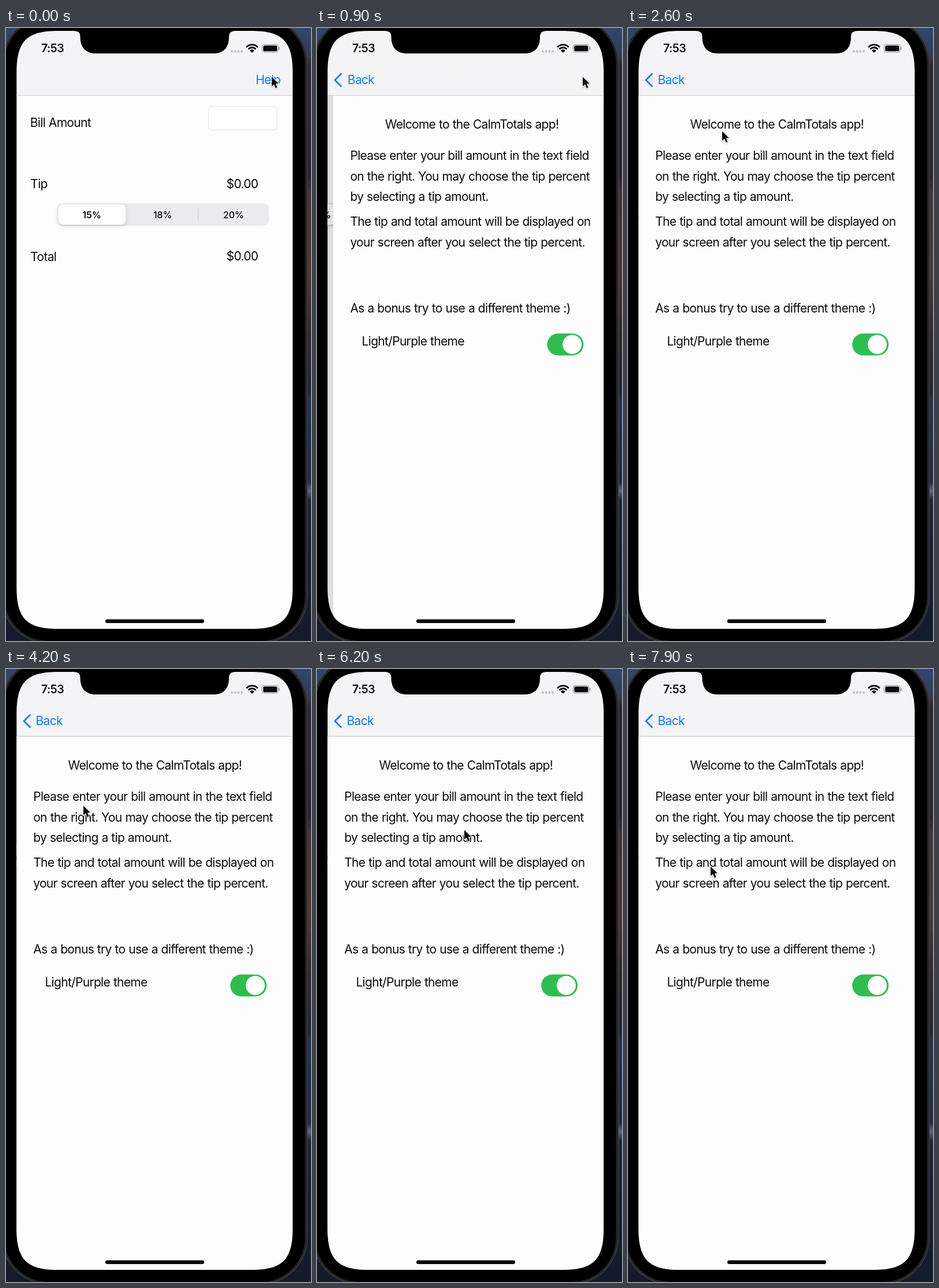
These frames come from a looping animation (528 px wide and 1060 px high, 8 s). An HTML page with a canvas:

```html
<!DOCTYPE html>
<html lang="en">
<head>
<meta charset="utf-8">
<title>Tip calculator help</title>
<style>
  html, body { margin: 0; width: 100%; height: 100%; overflow: hidden; background: #000; }
  canvas { display: block; width: 528px; height: 1060px; }
</style>
</head>
<body>
<canvas id="stage" width="528" height="1060"></canvas>
<script>
const ctx = document.getElementById('stage').getContext('2d');
const LOOP = 8000, STEP = 100;
const SCREEN = { x: 18.3, y: 5, w: 478, h: 1034 };
const BLUE = '#0a7aff', PAGE = '#fefdfe', BAR = '#f4f3f5';
const PUSH_START = 550, PUSH_RATE = 16.45;

// Pointer path: time, x, y
const PATH = [
  [1500, 459, 83], [1700, 380, 112], [2000, 110, 160], [2200, 36, 172],
  [2400, 158, 179], [2600, 162, 177], [3200, 400, 180], [3400, 385, 185],
  [3900, 124, 222], [4000, 121, 232], [4200, 133, 235], [5000, 448, 233],
  [5200, 430, 236], [5800, 145, 277], [6000, 186, 279], [6200, 254, 277],
  [6500, 288, 270], [6900, 250, 290], [7400, 91, 334], [7800, 142, 340]
];

function pointerAt(t) {
  if (t <= PATH[0][0]) return PATH[0].slice(1);
  for (let i = 1; i < PATH.length; i++) {
    const [t0, x0, y0] = PATH[i - 1], [t1, x1, y1] = PATH[i];
    if (t <= t1) {
      const k = (t - t0) / (t1 - t0);
      return [x0 + (x1 - x0) * k, y0 + (y1 - y0) * k];
    }
  }
  return PATH[PATH.length - 1].slice(1);
}

// Remaining fraction of the page push, as a critically damped spring
function pushLeft(t) {
  const x = PUSH_RATE * Math.max(0, t - PUSH_START) / 1000;
  return (1 + x) * Math.exp(-x);
}

function box(x, y, w, h, r, fill) {
  ctx.beginPath();
  ctx.roundRect(x, y, w, h, r);
  if (fill) { ctx.fillStyle = fill; ctx.fill(); }
}

// Rectangle with continuous corners: the curve spans a, its handles stop at c
function smoothBox(x, y, w, h, a, c) {
  const r = x + w, b = y + h;
  ctx.beginPath();
  ctx.moveTo(x + a, y);
  ctx.lineTo(r - a, y);
  ctx.bezierCurveTo(r - c, y, r, y + c, r, y + a);
  ctx.lineTo(r, b - a);
  ctx.bezierCurveTo(r, b - c, r - c, b, r - a, b);
  ctx.lineTo(x + a, b);
  ctx.bezierCurveTo(x + c, b, x, b - c, x, b - a);
  ctx.lineTo(x, y + a);
  ctx.bezierCurveTo(x, y + c, x + c, y, x + a, y);
  ctx.closePath();
}

function text(str, x, y, { size = 21, weight = 400, color = '#0b0b0c', gap = -0.69, align = 'left' } = {}) {
  ctx.font = `${weight} ${size}px Inter, sans-serif`;
  ctx.letterSpacing = gap + 'px';
  ctx.wordSpacing = '0.6px';
  ctx.textAlign = align;
  ctx.fillStyle = color;
  ctx.fillText(str, x, y);
}

function wallpaper() {
  const g = ctx.createLinearGradient(0, 0, 0, 1060);
  [[0, '#2f4570'], [0.045, '#343c54'], [0.06, '#2c2832'], [0.24, '#292530'],
   [0.27, '#453436'], [0.4, '#4e3836'], [0.5, '#33292d'], [0.59, '#212634'],
   [0.61, '#223558'], [0.74, '#1b2b49'], [0.755, '#5e6a7e'], [0.77, '#18263f'],
   [0.9, '#152036'], [1, '#131a2a']].forEach(([p, c]) => g.addColorStop(p, c));
  ctx.fillStyle = g;
  ctx.fillRect(0, 0, 528, 1060);
}

function phoneBody() {
  box(-7, -20, 528.5, 1084, 81, '#242325');
  ctx.strokeStyle = '#434041';
  ctx.lineWidth = 1.2;
  ctx.stroke();
  box(-3, -16, 520.5, 1076, 77, '#000');
}

function billPage(dx) {
  ctx.save();
  ctx.translate(dx, 0);
  ctx.fillStyle = PAGE;
  ctx.fillRect(18, 116, 479, 930);
  text('Bill Amount', 41.8, 171);
  text('Tip', 42.3, 277);
  text('Total', 42.3, 403);
  text('$0.00', 381.6, 276.5);
  text('$0.00', 381.6, 402);

  box(350.5, 135.5, 118.5, 41, 6.5, '#fff');
  ctx.strokeStyle = '#e2e1e4';
  ctx.lineWidth = 1.2;
  ctx.stroke();

  box(88.5, 303, 367, 39, 10, '#ebeaec');
  ctx.save();
  ctx.shadowColor = 'rgba(0,0,0,.18)';
  ctx.shadowBlur = 7;
  ctx.shadowOffsetY = 2;
  box(90.5, 305, 117, 35, 8.5, '#fff');
  ctx.restore();
  ctx.fillStyle = '#cfced1';
  ctx.fillRect(332, 311, 1.2, 22);
  ['15%', '18%', '20%'].forEach((s, i) => text(s, 148.5 + i * 122.7, 328.5,
    { size: 16, weight: i ? 500 : 600, gap: -0.1, align: 'center' }));
  ctx.restore();
}

function helpPage(dx) {
  ctx.save();
  ctx.translate(dx, 0);
  ctx.fillStyle = PAGE;
  ctx.fillRect(18, 116, 479, 930);
  text('Welcome to the CalmTotals app!', 107.6, 174);
  [['Please enter your bill amount in the text field', 228],
   ['on the right. You may choose the tip percent', 263.5],
   ['by selecting a tip amount.', 299],
   ['The tip and total amount will be displayed on', 342],
   ['your screen after you select the tip percent.', 377.5],
   ['As a bonus try to use a different theme :)', 491.5]
  ].forEach(([s, y]) => text(s, 47.2, y));
  text('Light/Purple theme', 67.4, 549);

  box(388.2, 528.2, 63, 38, 19, '#30bd50');
  box(415, 530.7, 33, 33, 16.5, '#fefefe');
  ctx.restore();
}

function navBar(left) {
  ctx.fillStyle = BAR;
  ctx.fillRect(18, 0, 479, 116);
  if (left < 1 && left > 0.005) {
    const edge = left * SCREEN.w;
    const g = ctx.createLinearGradient(edge, 0, edge + 60, 0);
    g.addColorStop(0, 'rgba(253,253,255,.3)');
    g.addColorStop(1, 'rgba(253,253,255,.75)');
    ctx.globalAlpha = Math.min(1, left * 3);
    ctx.fillStyle = g;
    ctx.fillRect(18, 0, 479, 116);
    ctx.globalAlpha = 1;
  }
  ctx.fillStyle = '#cbcacd';
  ctx.fillRect(18, 116, 479, 1);

  ctx.globalAlpha = Math.min(1, Math.max(0, (left - 0.25) / 0.6));
  text('Help', 432.2, 97, { color: BLUE });
  ctx.globalAlpha = 1 - left;
  text('Back', 51.5 + left * 64, 97, { color: BLUE });
  ctx.strokeStyle = BLUE;
  ctx.lineWidth = 2.8;
  ctx.lineCap = ctx.lineJoin = 'round';
  ctx.beginPath();
  ctx.moveTo(41.5, 79.5);
  ctx.lineTo(31, 90);
  ctx.lineTo(41.5, 100.5);
  ctx.stroke();
  ctx.globalAlpha = 1;
}

function statusBar() {
  text('7:53', 61, 42, { size: 19.5, weight: 600, gap: -0.5 });
  for (let i = 0; i < 4; i++) box(389 + i * 5.7, 38.5, 4, 4, 1.6, '#c3c2c6');

  // Wi-Fi fan
  ctx.save();
  ctx.beginPath();
  ctx.moveTo(426, 43);
  ctx.lineTo(412, 29);
  ctx.lineTo(412, 20);
  ctx.lineTo(440, 20);
  ctx.lineTo(440, 29);
  ctx.closePath();
  ctx.clip();
  ctx.strokeStyle = ctx.fillStyle = '#0b0b0c';
  ctx.lineWidth = 2.9;
  [8.6, 13.4].forEach(r => {
    ctx.beginPath();
    ctx.arc(426, 42.3, r, Math.PI, 0);
    ctx.stroke();
  });
  ctx.beginPath();
  ctx.arc(426, 42.3, 5, Math.PI, 0);
  ctx.fill();
  ctx.restore();

  // Battery
  box(443.5, 28.5, 27.5, 13.5, 4.2);
  ctx.strokeStyle = '#98979a';
  ctx.lineWidth = 1.2;
  ctx.stroke();
  box(445.3, 30.3, 24, 10, 2.6, '#0b0b0c');
  box(472.2, 33, 1.6, 4.8, 0.8, '#98979a');
}

function notch() {
  ctx.fillStyle = '#000';
  ctx.beginPath();
  ctx.moveTo(118, 0);
  ctx.lineTo(118, 5);
  ctx.quadraticCurveTo(128.5, 5, 128.5, 15);
  ctx.bezierCurveTo(128.5, 34, 138, 44, 156, 44);
  ctx.lineTo(359, 44);
  ctx.bezierCurveTo(377, 44, 386, 34, 386, 15);
  ctx.quadraticCurveTo(386, 5, 397, 5);
  ctx.lineTo(397, 0);
  ctx.fill();
}

function pointer(x, y) {
  ctx.save();
  ctx.translate(x + 1, y + 1.5);
  ctx.beginPath();
  [[0, 0], [0, 16.5], [3.9, 13], [6.7, 19.4], [9.6, 18.1], [6.8, 11.9], [11.8, 11.6]]
    .forEach(p => ctx.lineTo(...p));
  ctx.closePath();
  ctx.lineJoin = 'round';
  ctx.shadowColor = 'rgba(0,0,0,.25)';
  ctx.shadowBlur = 3;
  ctx.shadowOffsetY = 1.5;
  ctx.strokeStyle = '#fff';
  ctx.lineWidth = 2;
  ctx.stroke();
  ctx.shadowColor = 'transparent';
  ctx.fillStyle = '#050505';
  ctx.fill();
  ctx.restore();
}

function draw(t) {
  const left = pushLeft(t);
  wallpaper();
  phoneBody();

  ctx.save();
  smoothBox(SCREEN.x, SCREEN.y, SCREEN.w, SCREEN.h, 72, 17.6);
  ctx.clip();
  billPage(-0.3 * SCREEN.w * (1 - left));
  if (left < 1) {
    ctx.fillStyle = `rgba(0,0,0,${0.12 * (1 - left)})`;
    ctx.fillRect(18, 116, 479, 930);
    helpPage(SCREEN.w * left);
  }
  navBar(left);
  statusBar();
  notch();
  box(172, 1022.6, 171, 6.4, 3.2, '#050505');
  ctx.restore();

  pointer(...pointerAt(t));
}

function tick() {
  const t = performance.now() % LOOP;
  draw(Math.floor(t / STEP) * STEP);
  requestAnimationFrame(tick);
}
tick();
</script>
</body>
</html>
```
